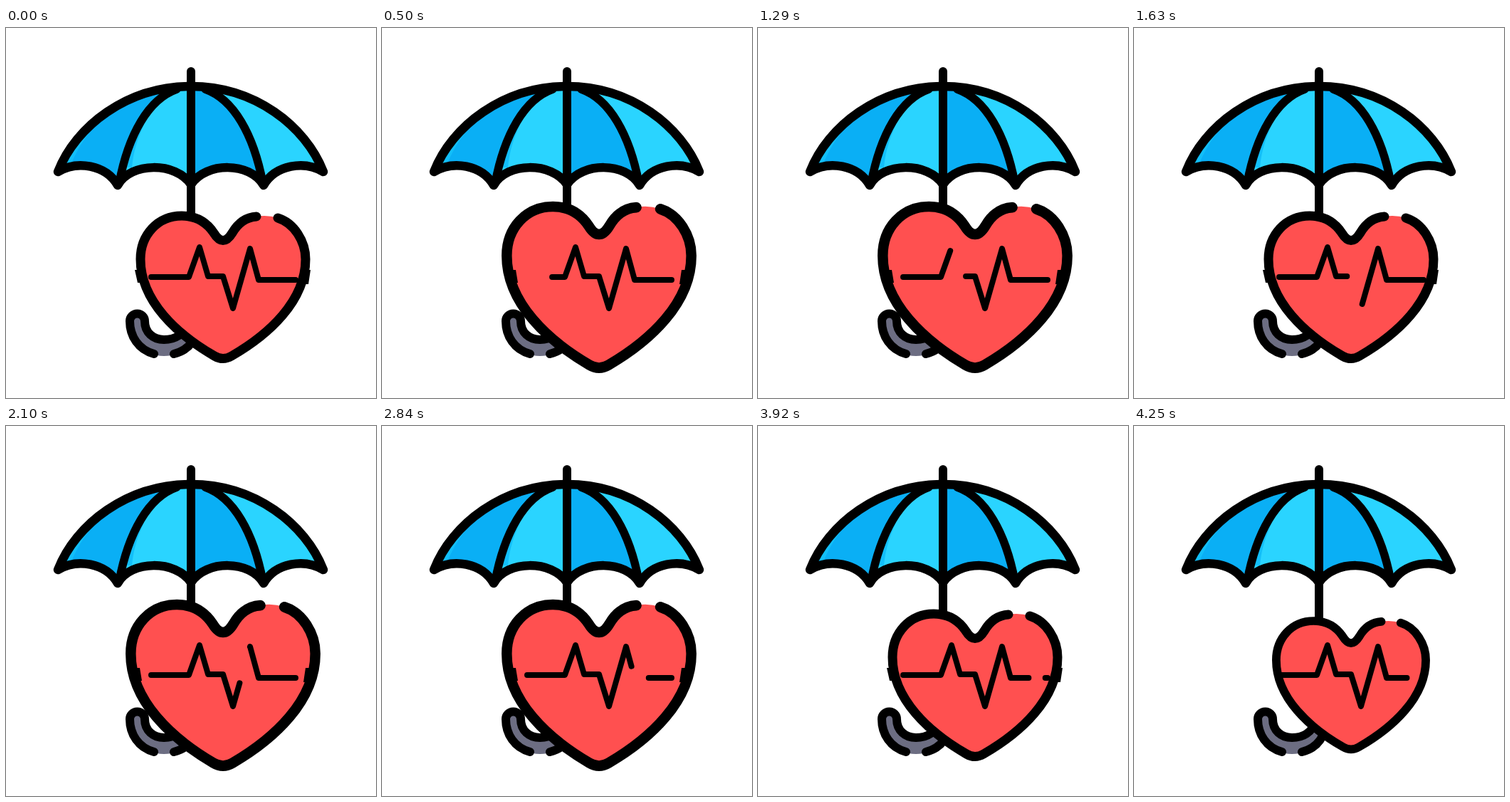
An HTML page that plays this animation: 520x520 px, repeating every 4.28 s.

```html
<!DOCTYPE html>
<html lang="en">
<head>
<meta charset="utf-8">
<title>Heart under umbrella</title>
<style>
  html, body { margin: 0; width: 100%; height: 100%; overflow: hidden; background: #fff; }
  svg { display: block; width: 100vw; height: 100vh; }
  .line { fill: none; stroke: #000; stroke-linecap: round; stroke-linejoin: round; }
  .dark { fill: #0aaff5; }
  .light { fill: #2ad4ff; }
  .shade { fill: #12bffa; }
</style>
</head>
<body>
<svg viewBox="0 0 520 520">
  <!-- handle -->
  <path fill="#6c6d82" d="M174 412A10.5 10.5 0 0 1 195 412C195 428 207 438 222 438C238 438 250 430 255 416L270 425C265 448 245 461 222 461C194 461 174 438 174 412Z"/>
  <path class="line" stroke-width="12" d="M208 458C186 452 174 433 174 412A10.5 10.5 0 0 1 195 412C195 428 207 438 222 438C238 438 250 430 255 416M236 458C252 454 263 444 268 428"/>

  <!-- canopy -->
  <path class="light" d="M73 202C98 138 170 82 260 82C350 82 421 138 446 202C419 186 379 192 362 221C343 188 281 188 260 220C239 188 175 188 157 221C140 192 100 186 73 202Z"/>
  <path class="dark" d="M73 202C98 138 170 82 260 82L240 86C200 100 172 150 159 218C140 192 100 186 73 202Z"/>
  <path class="dark" d="M260 82L280 86C320 100 348 150 361 218C343 188 281 188 260 220Z"/>
  <path class="shade" d="M200 124Q180 160 177 196H166Q174 155 192 124Z"/>
  <path class="shade" d="M84 192Q100 155 134 128Q106 156 92 190Z"/>
  <path class="line" stroke-width="12.5" d="M73 202C98 138 170 82 260 82C350 82 421 138 446 202C419 186 379 192 362 221C343 188 281 188 260 220C239 188 175 188 157 221C140 192 100 186 73 202Z"/>
  <path class="line" stroke-width="11.5" d="M240 86C200 100 172 150 159 218M280 86C320 100 348 150 361 218"/>
  <path class="line" stroke-width="12" d="M260 61V274"/>

  <!-- heart -->
  <g id="heart">
    <path fill="#ff5050" d="M352 265C335 266 325 276 318 288Q305 309 292 288C280 270 264 264 247 264C213 264 189 291 189 325C189 384 241 431 293 461Q305 468 317 461C369 431 421 384 421 325C421 300 405 274 382 267Q367 262 352 265Z"/>
    <path class="line" stroke-width="13" d="M352 265C335 266 325 276 318 288Q305 309 292 288C280 270 264 264 247 264C213 264 189 291 189 325C189 384 241 431 293 461Q305 468 317 461C369 431 421 384 421 325C421 300 405 274 382 267"/>
  </g>
  <path id="ticks" d="M181 340H188L191 358H185ZM428 340H421L418 360H425Z"/>
  <polyline id="pulse" class="line" stroke-width="8" points="204,350 257,350 272,308 284,349 305,349 319,394 343,310 355,354 407,354"/>
</svg>
<script>
const LOOP = 4280;
const BEAT = 67.5;
const PULSE = 70;
const heart = document.getElementById('heart');
const ticks = document.getElementById('ticks');
const pulse = document.getElementById('pulse');

// Heart scale on each beat: medium, large, small
const SIZES = [[1, 1], [1.118, 1.13], [0.906, 0.9]];

// Quick even beats, then a few slow, uneven ones
const beats = Array.from({ length: 39 }, (_, i) => 30 + BEAT * i)
  .concat(2840, 2970, 3000, 3360, 3590, 3720, 4120, 4250);

// Distance along the line: slow, fast, slow around time mid
const glide = (t, from, to, mid, rate) =>
  from + (to - from) / (1 + Math.exp(-rate * (t - mid)));

function draw(t) {
  const size = beats.filter(b => b <= t).length % SIZES.length;
  const [sx, sy] = SIZES[size];
  heart.setAttribute('transform', `translate(305 364) scale(${sx} ${sy}) translate(-305 -364)`);
  ticks.style.display = size === 2 ? 'none' : '';

  // A gap travels along the pulse line
  const held = Math.floor(t / PULSE) * PULSE;
  const start = glide(held, -60, 375, 1620, 0.00172);
  const end = glide(held, -30, 395, 1440, 0.0018);
  pulse.style.strokeDasharray = `400 ${end - start}`;
  pulse.style.strokeDashoffset = 400 - start;
}

const begun = performance.now();
function tick() {
  draw((performance.now() - begun) % LOOP);
  requestAnimationFrame(tick);
}
tick();
</script>
</body>
</html>
```
